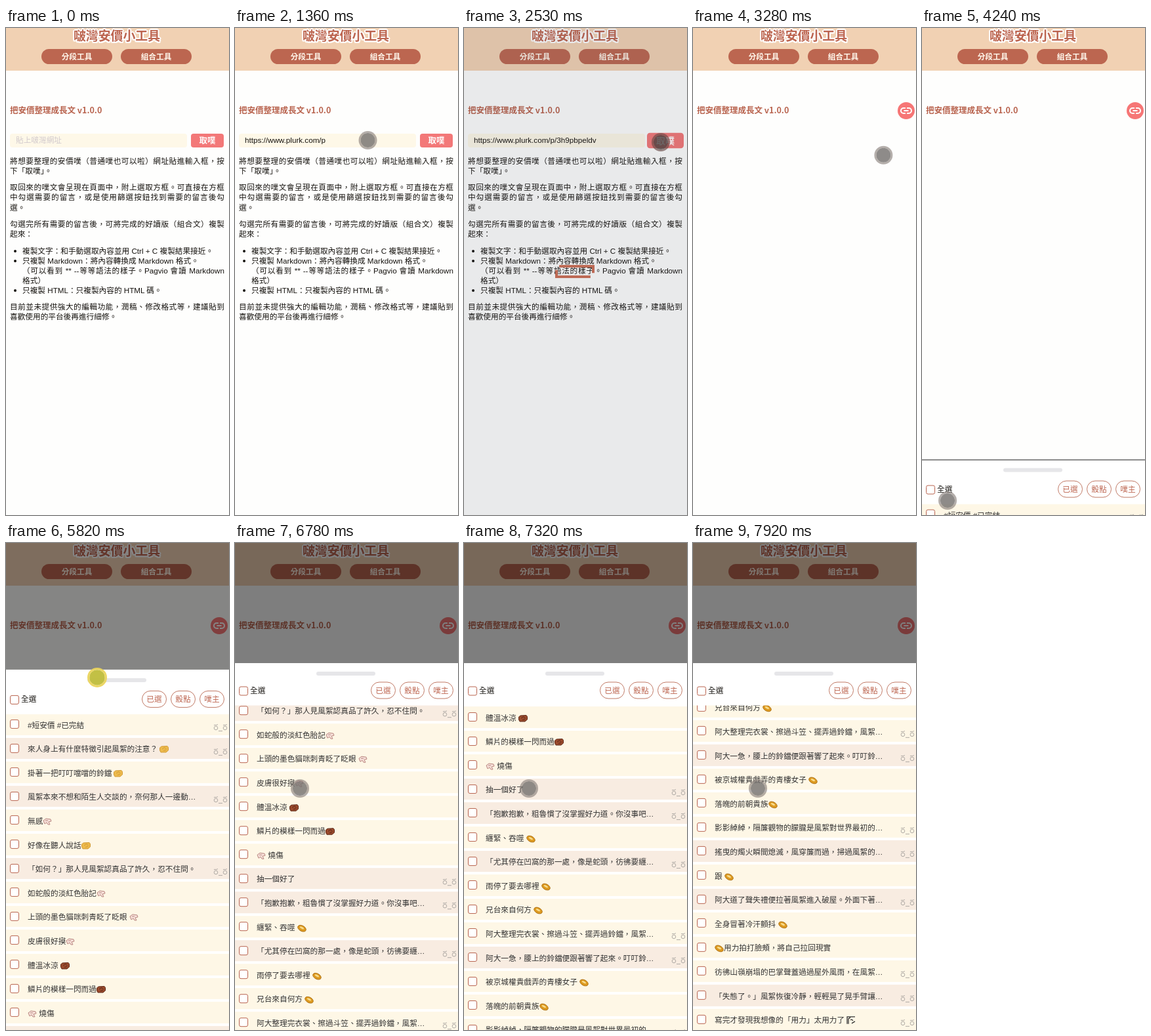
An HTML page that plays this animation: 340x742 px, repeating every 7.99 s.

```html
<!DOCTYPE html>
<html lang="zh-Hant">
<head>
<meta charset="utf-8">
<style>
html, body { margin: 0; width: 100%; height: 100%; overflow: hidden; background: #fefefd; }
#stage { position: absolute; left: 0; top: 0; width: 340px; height: 742px; overflow: hidden; background: #fefefd;
  font: 11.66px/16px "Liberation Sans", "Noto Sans CJK TC", "Noto Sans CJK", sans-serif; color: #16130f; }
#stage div { position: absolute; box-sizing: border-box; white-space: nowrap; }
svg { display: block; overflow: visible; }
.cjk { font-family: "Noto Sans CJK TC", "Noto Sans CJK", sans-serif; font-weight: 700; }
.header { left: 0; top: 0; width: 340px; height: 64.5px; background: #f1d1b3; }
.title { left: 0; top: 0; width: 338px; text-align: center; font-size: 18.9px; line-height: 22px; color: #bd6651;
  text-shadow: 2px 0 #fff, -2px 0 #fff, 0 2px #fff, 0 -2px #fff, 1.5px 1.5px #fff, -1.5px 1.5px #fff,
    1.5px -1.5px #fff, -1.5px -1.5px #fff, 0 0 3px #fff; }
.tab { top: 32px; width: 108px; height: 23px; border-radius: 12px; background: #bc6650; color: #fff6ea;
  text-align: center; line-height: 21px; }
.version { left: 6px; top: 117px; font-size: 12.5px; color: #b9644f; }
#link { left: 312px; top: 113px; width: 26px; height: 26px; border-radius: 50%; background: #f67676; }
#form, #sheet, #list, #bar { left: 0; top: 0; width: 340px; }
.line { font-weight: 500; }
.just { text-align: justify; text-align-last: justify; white-space: normal !important; }
.bullet { left: 12px; width: 4px; height: 4px; border-radius: 50%; background: #16130f; }
.field { left: 6px; top: 161px; width: 270px; height: 21px; border-radius: 4px; background: #fef8e8; }
#hint, #url { left: 15px; top: 163px; }
#hint { color: #d1c9cc; }
#fetch { left: 282px; top: 161px; width: 50px; height: 21px; border-radius: 4px; background: #f37878; color: #fff;
  text-align: center; font-size: 12.5px; line-height: 19px; }
#dim, #veil { left: 0; top: 0; width: 340px; height: 742px; }
#dim { background: #000; }
#sheet { height: 742px; background: #fff; border-top: 1px solid; }
#view { left: 0; top: 20px; width: 340px; height: 720px; overflow: hidden; }
#bar { height: 47px; background: #fff; }
.grip { left: 124px; top: 12px; width: 90px; height: 6px; border-radius: 3px; background: #e6e6e9; }
.box { left: 6px; width: 14px; height: 14px; border: 1.8px solid #b9644f; border-radius: 3px; background: #fff; }
.pill { top: 11px; width: 38px; height: 26px; border: 1px solid #c07864; border-radius: 13px; color: #bd6651;
  text-align: center; line-height: 23px; }
.row { left: 0; width: 340px; height: 32.6px; background: #fef7e6; color: #333; }
.row.alt { background: #f8ece1; }
.row .box { top: 9px; }
.row .text { left: 33px; top: 9.5px; }
.row .face { left: 316px; top: 16px; }
.row .text svg { display: inline-block; vertical-align: -3px; }
#veil { background: rgb(50, 60, 80); }
#loader { left: 139px; top: 361px; }
#dot { left: -14px; top: -14px; width: 28px; height: 28px; border-radius: 50%; border: 3px solid; background-clip: padding-box; }
</style>
</head>
<body>
<div id="stage">
  <div class="header"></div>
  <div class="title cjk">啵灣安價小工具</div>
  <div class="tab cjk" style="left:54px">分段工具</div>
  <div class="tab cjk" style="left:175px">組合工具</div>
  <div class="version cjk">把安價整理成長文 v1.0.0</div>
  <div id="link"><svg width="26" height="26" viewBox="0 0 26 26" fill="none" stroke="#fff" stroke-width="2">
    <path d="M12 9H9a4 4 0 0 0 0 8h3M14 9h3a4 4 0 0 1 0 8h-3M9.5 13h7"/></svg></div>
  <div id="form">
    <div class="field"></div>
    <div id="hint">貼上啵灣網址</div>
    <div id="url"></div>
    <div id="fetch" class="cjk">取噗</div>
  </div>
  <div id="dim"></div>
  <div id="sheet">
    <div class="grip"></div>
    <div id="view">
      <div id="list"></div>
      <div id="bar">
        <div class="box" style="top:17.5px"></div>
        <div style="left:23px;top:16px">全選</div>
        <div class="pill" style="left:207px">已選</div>
        <div class="pill" style="left:251px">骰點</div>
        <div class="pill" style="left:295px">噗主</div>
      </div>
    </div>
  </div>
  <div id="veil"></div>
  <div id="loader"><svg width="60" height="20" fill="none" stroke="#bd6a55" stroke-width="4">
    <path id="trace" d="M2 2H58V18H2Z" stroke-dasharray="62 10"/></svg></div>
  <div id="dot"></div>
</div>
<script>
const LOOP = 7990, PITCH = 36.6, STICK = 3.5;
const URL_TEXT = "https://www.plurk.com/p/3h9pbpeldv";
const $ = id => document.getElementById(id);

// x, centre y, text; a trailing "=" justifies the line
const lines = [
  [6, 203, "將想要整理的安價噗（普通噗也可以啦）網址貼進輸入框，按="],
  [6, 218, "下「取噗」。"],
  [6, 243, "取回來的噗文會呈現在頁面中，附上選取方框。可直接在方框="],
  [6, 258, "中勾選需要的留言，或是使用篩選按鈕找到需要的留言後勾="],
  [6, 274, "選。"],
  [6, 299, "勾選完所有需要的留言後，可將完成的好讀版（組合文）複製="],
  [6, 314, "起來："],
  [25, 340, "複製文字：和手動選取內容並用 Ctrl + C 複製結果接近。"],
  [25, 355, "只複製 Markdown：將內容轉換成 Markdown 格式。"],
  [25, 370, "（可以看到 ** --等等語法的樣子。Pagvio 會讀 Markdown="],
  [25, 385, "格式）"],
  [25, 400, "只複製 HTML：只複製內容的 HTML 碼。"],
  [6, 425, "目前並未提供強大的編輯功能，潤稿、修改格式等，建議貼到="],
  [6, 440, "喜歡使用的平台後再進行細修。"]
];

// "@" darker row, "^" face at the right, "~x" icon
const rows = [
  "^#短安價 #已完結", "@^來人身上有什麼特徵引起風絮的注意？ ~y", "掛著一把叮叮噹噹的鈴鐺 ~y",
  "@^風絮本來不想和陌生人交談的，奈何那人一邊動…", "無感~p", "好像在聽人說話~y",
  "@^「如何？」那人見風絮認真品了許久，忍不住問。", "如蛇般的淡紅色胎記~p",
  "上頭的墨色貓咪刺青眨了眨眼 ~p", "皮膚很好摸~p", "體溫冰涼 ~b", "鱗片的模樣一閃而過~b", "~p  燒傷",
  "@^抽一個好了", "@^「抱歉抱歉，粗魯慣了沒掌握好力道。你沒事吧…", "纏緊、吞噬 ~g",
  "@^「尤其停在凹窩的那一處，像是蛇頭，彷彿要纏…", "雨停了要去哪裡 ~g", "兄台來自何方 ~g",
  "^阿大整理完衣裳、擦過斗笠、擺弄過鈴鐺，風絮…", "@^阿大一急，腰上的鈴鐺便跟著響了起來。叮叮鈴…",
  "被京城權貴戲弄的青樓女子 ~g", "落魄的前朝貴族~g",
  "^影影綽綽，隔簾觀物的朦朧是風絮對世界最初的…", "@^搖曳的燭火瞬間熄滅，風穿簾而過，掃過風絮的…",
  "跟 ~g", "@^阿大道了聲失禮便拉著風絮進入破屋。外面下著…", "全身冒著冷汗顫抖 ~g",
  "~g用力拍打臉頰，將自己拉回現實", "^彷彿山嶺崩塌的巴掌聲蓋過過屋外風雨，在風絮…",
  "@^「失態了。」風絮恢復冷靜，輕輕晃了晃手臂讓…", "^寫完才發現我想像的「用力」太用力了 ~k"
];

const fist = (fill, edge) => `<path d="M.5 5L3 3 12 2.5 13.5 4.5 13.5 9 10 12 2 12 .5 9Z" fill="${fill}" stroke="${edge}" stroke-linejoin="round"/>
  <path d="M4 7L8 4.5 10.5 7.5M6 9.5L10 8.5" fill="none" stroke="${edge}"/>`;
const icons = {
  y: fist("#edba4c", "#d29b38"),
  b: fist("#9a4a2c", "#5e2a1a"),
  p: `<path d="M1 6L5 3 12 4 13 7 9 8 11 12 8 12 6 9 3 11Z" fill="#f6dfd8" stroke="#b98780" stroke-linejoin="round"/>
    <path d="M4 6L8 6" stroke="#b98780"/>`,
  g: `<g transform="rotate(28 7 8)"><ellipse cx="7" cy="8" rx="6.8" ry="4.2" fill="#dd9a20" stroke="#a96c14" stroke-width=".8"/>
    <ellipse cx="6.5" cy="7.3" rx="3.4" ry="1.4" fill="#f8dc8c"/></g>`,
  k: `<path d="M1 13V2H13M3 13V5L6 3M6 7Q8 5 10 8M8 12L13 9" fill="none" stroke="#333" stroke-width="1.3"/>`
};
const svgIcon = k => `<svg width="14" height="14" viewBox="0 0 14 14">${icons[k]}</svg>`;
const face = `<div class="face"><svg width="22" height="11" fill="none" stroke="#a8a39f" stroke-width=".9">
  <path d="M1 1.5H5L7 .5M15 1.5H19L21 .5M8 10.5H14"/><circle cx="4" cy="6" r="2.8"/><circle cx="18" cy="6" r="2.8"/></svg></div>`;

function build() {
  let html = "";
  for (const [x, y, text] of lines) {
    const just = text.endsWith("=");
    const width = just ? `;width:${333 - x}px` : "";
    html += `<div class="line${just ? " just" : ""}" style="left:${x}px;top:${y - 8}px${width}">${text.replace("=", "")}</div>`;
  }
  for (const y of [340, 355, 400]) html += `<div class="bullet" style="top:${y - 2}px"></div>`;
  $("form").insertAdjacentHTML("beforeend", html);

  $("list").innerHTML = rows.map((row, i) => {
    const text = row.replace(/^@?\^?/, "").replace(/~(.)/, (_, k) => svgIcon(k)).replace("  ", "&nbsp; ");
    return `<div class="row${row[0] === "@" ? " alt" : ""}" style="top:${46 + i * PITCH}px">
      <div class="box"></div><div class="text">${text}</div>${row.includes("^") ? face : ""}</div>`;
  }).join("");
}

const clamp = (v, a = 0, b = 1) => Math.min(b, Math.max(a, v));
const span = (t, a, b) => clamp((t - a) / (b - a));
const ease = {
  io: p => p < .5 ? 4 * p ** 3 : 1 - 4 * (1 - p) ** 3,
  in: p => p * p,
  out: p => 1 - (1 - p) ** 2,
  lin: p => p
};

// keys: [time, ...values, ease towards this key]
function track(keys, t) {
  let a = keys[0];
  for (const b of keys) {
    if (t <= b[0]) {
      const p = a === b ? 1 : ease[b.at(-1)](span(t, a[0], b[0]));
      return b.slice(1, -1).map((v, i) => a[i + 1] + (v - a[i + 1]) * p);
    }
    a = b;
  }
  return a.slice(1, -1);
}

const dotPath = [
  [260, 323, 682, "lin"], [850, 200, 171, "io"], [1250, 200, 171, "lin"], [1850, 300, 174, "io"],
  [3170, 300, 174, "lin"], [3700, 39, 712, "io"], [3900, 39, 712, "lin"], [4200, 39, 720, "io"],
  [4480, 39, 720, "lin"], [4870, 93, 483, "in"], [5300, 139, 420, "out"], [5550, 139, 420, "lin"],
  [5800, 139, 205, "io"], [5960, 139, 195, "io"], [6000, 139, 195, "lin"], [6300, 99, 374, "io"]
];
const sheetPath = [
  [4000, 742, "lin"], [4605, 408, "io"], [5550, 408, "lin"], [5800, 193, "io"], [5960, 183, "io"]
];
const scrollPath = [
  [6370, 0, "lin"], [7120, 366, "io"], [7310, 367, "lin"], [7680, 655, "io"], [7840, 655, "lin"],
  [7920, 675, "in"], [7990, 684, "lin"]
];

function draw(t) {
  const loaded = t >= 2740;
  $("form").style.display = loaded ? "none" : "";
  $("hint").style.display = t < 1090 ? "" : "none";
  $("url").textContent = URL_TEXT.slice(0, Math.round(URL_TEXT.length * span(t, 1060, 1500)));
  $("fetch").style.transform = `scale(${1 + .12 * span(t, 2050, 2250)})`;
  $("link").style.transform = `scale(${loaded ? .7 + .3 * span(t, 2740, 2950) : 0})`;

  const busy = t >= 2350 && !loaded;
  $("veil").style.opacity = busy ? .1 * span(t, 2350, 2500) : 0;
  $("loader").style.opacity = busy ? span(t, 2350, 2450) : 0;
  $("trace").setAttribute("stroke-dashoffset", -4 - (t - 2530) * .144);

  const [top] = track(sheetPath, t), [scroll] = track(scrollPath, t);
  $("sheet").style.transform = `translateY(${top}px)`;
  $("sheet").style.visibility = top < 742 ? "visible" : "hidden";
  $("sheet").style.borderTopColor = `rgba(0,0,0,${clamp((top - 300) / 400, 0, .9)})`;
  $("bar").style.transform = `translateY(${-Math.min(scroll, STICK)}px)`;
  $("list").style.transform = `translateY(${-scroll}px)`;
  $("dim").style.opacity = .5 * span(408 - top, 0, 225);

  const [x, y] = track(dotPath, t), dot = $("dot").style;
  const held = t >= 5480 && t < 6000, pressed = t >= 2250 && t < 2740;
  dot.opacity = span(t, 259, 400);
  dot.transform = `translate(${x}px,${y}px) scale(${held ? 1.07 : 1})`;
  dot.backgroundColor = held ? "rgba(192,190,62,.96)" : pressed ? "rgba(75,65,64,.8)" : "rgba(118,114,112,.82)";
  dot.borderColor = held ? "rgba(234,212,92,.95)" : pressed ? "rgba(105,75,72,.65)" : "rgba(135,125,120,.62)";
}

build();
const start = performance.now();
function frame() {
  draw((performance.now() - start) % LOOP);
  requestAnimationFrame(frame);
}
frame();
</script>
</body>
</html>
```
